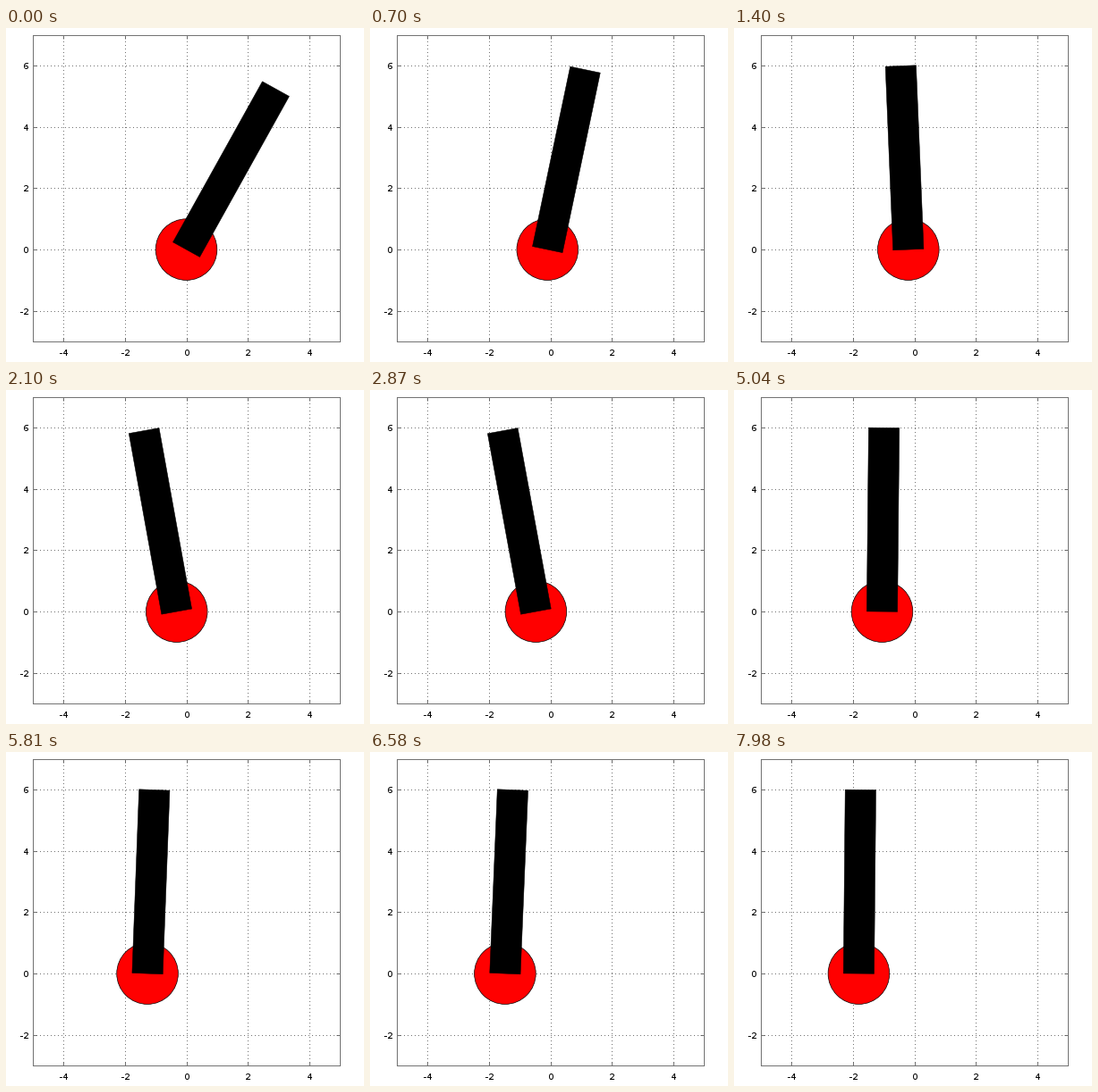
Recreate the animation shown at these times as a matplotlib script. Size 400 px wide and 374 px high, loop 8000 ms.

```python
import numpy as np
import matplotlib.pyplot as plt
from matplotlib.animation import FuncAnimation
from matplotlib.patches import Circle, Polygon

WIDTH, HEIGHT, DPI = 400, 374, 100
LOOP_MS, TICK_MS, STEP_MS = 8000, 20, 70
HELD_STEP = 100          # the motion pauses for this one step
PX = 72 / DPI            # one pixel in points
BAR_LENGTH, BAR_WIDTH = 6, 1

# Key poses: time in s, cart position, and bar tilt in degrees (right is positive)
CART_TIMES = np.array([0, 1.4, 2.87, 3.92, 5.04, 6.58, 7.98])
CART_X = np.array([0, -0.195, -0.47, -0.735, -1.05, -1.475, -1.81])
TILT_TIMES = np.array([0, 0.84, 1.4, 1.68, 2.52, 2.87, 3.36, 3.92, 5.04, 6.58, 7.98])
TILT = np.array([29.05, 8.7, -2.37, -6.6, -11.2, -10.4, -8.3, -5.1, 0.58, 2.37, 0.55])


def smooth(t, times, values):
    """Cubic Hermite curve through the key values."""
    slopes = np.gradient(values, times)
    i = int(np.clip(np.searchsorted(times, t, side="right") - 1, 0, len(times) - 2))
    h = times[i + 1] - times[i]
    u = (t - times[i]) / h
    return ((1 + 2 * u) * (1 - u) ** 2 * values[i] + u * (1 - u) ** 2 * h * slopes[i]
            + u * u * (3 - 2 * u) * values[i + 1] + u * u * (u - 1) * h * slopes[i + 1])


def bar_corners(x, tilt):
    along = BAR_LENGTH * np.array([np.sin(tilt), np.cos(tilt)])
    across = BAR_WIDTH / 2 * np.array([np.cos(tilt), -np.sin(tilt)])
    base = np.array([x, 0])
    return [base - across, base + across, base + along + across, base + along - across]


plt.rcParams.update({"font.family": "DejaVu Sans", "axes.unicode_minus": False,
                     "text.hinting": "native", "text.hinting_factor": 1})
fig = plt.figure(figsize=(WIDTH / DPI, HEIGHT / DPI), dpi=DPI, facecolor="white")
ax = fig.add_axes([30 / WIDTH, 23 / HEIGHT, 343 / WIDTH, 343 / HEIGHT])
ax.set(xlim=(-5, 5), ylim=(-3, 7), xticks=range(-4, 5, 2), yticks=range(-2, 7, 2))
ax.set_axisbelow(True)
# The half-pixel dash offset keeps each dot on a whole pixel
ax.grid(color="0.45", linewidth=PX, linestyle=(0.5, (1, 3)))
ax.tick_params(direction="in", top=True, right=True, length=4 * PX, width=0.8 * PX,
               color="0.3", labelsize=10 * PX)
ax.tick_params(axis="x", pad=8 * PX)
ax.tick_params(axis="y", pad=4.5 * PX)
for spine in ax.spines.values():
    spine.set(linewidth=PX, color="0.45")

wheel = ax.add_patch(Circle((0, 0), 1, facecolor="red", edgecolor="black",
                            linewidth=0.7 * PX, zorder=3))
bar = ax.add_patch(Polygon(bar_corners(0, 0), facecolor="black", edgecolor="black",
                           linewidth=0.5 * PX, zorder=4))


def update(n):
    step = int((n + 0.5) * TICK_MS // STEP_MS)
    if step == HELD_STEP:
        step -= 1
    t = step * STEP_MS / 1000
    x = smooth(t, CART_TIMES, CART_X)
    wheel.center = (x, 0)
    bar.set_xy(bar_corners(x, np.radians(smooth(t, TILT_TIMES, TILT))))
    return wheel, bar


anim = FuncAnimation(fig, update, frames=LOOP_MS // TICK_MS, interval=TICK_MS,
                     repeat=True, repeat_delay=0, blit=False)
plt.show()
```
